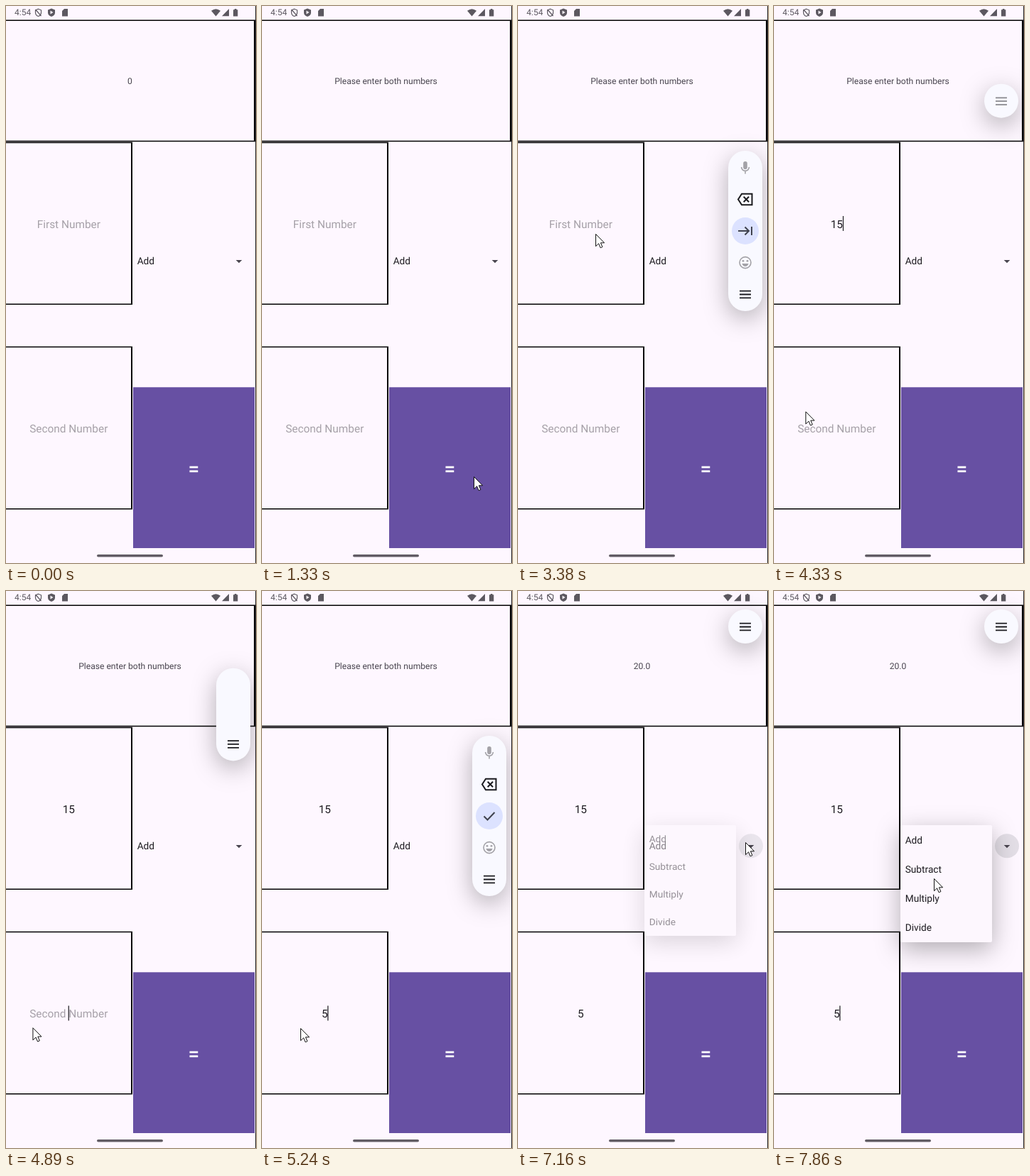
An HTML page for the animation above (8 s loop, 352x785 px).

```html
<!DOCTYPE html>
<html lang="en">
<head>
<meta charset="utf-8">
<title>Calculator demo</title>
<style>
  html, body { margin: 0; width: 100%; height: 100%; overflow: hidden; background: #fef7ff; }
  svg { display: block; width: 352px; height: 785px; font-family: Roboto, "Noto Sans", sans-serif; text-rendering: geometricPrecision; }
  .mid { text-anchor: middle; }
  .field { font-size: 15.4px; }
  .item { font-size: 13.7px; fill: #1d1b20; }
  .line { fill: none; stroke: currentColor; stroke-width: 2; }
  .thin { stroke-width: 1.6; }
  .float { filter: drop-shadow(0 10px 17px rgba(0, 0, 0, .3)); }
</style>
</head>
<body>
<svg viewBox="0 0 352 785">
  <rect width="352" height="785" fill="#fef7ff"/>

  <!-- status bar -->
  <g fill="#5c5860">
    <text x="12" y="13.4" font-size="12">4:54</text>
    <path d="M45.5 4.2l4 1.6v3.4q0 3.8-4 5.3q-4-1.500-4-5.3V5.8zM41.5 5l8 9" fill="none" stroke="#5c5860" stroke-width="1.2"/>
    <path d="M64 3.4l5 2v3.8q0 4.2-5 5.8q-5-1.6-5-5.8V5.4z"/>
    <path d="M62.5 6.4v5.2l4-2.6z" fill="#fef7ff"/>
    <path d="M82 4h5v10.5h-8V7z"/>
    <path d="M289 6.7q6.5-5 13 0L295.5 14.5z"/>
    <path d="M304 14.3L314 4v10.3z"/>
    <path d="M320 5.2h1.8V4h2.7v1.2h1.8v9.3H320z"/>
  </g>

  <!-- layout -->
  <path class="line" d="M350 20V191M177 192V421M177 480V709"/>
  <path class="line" style="stroke-width:1.5" d="M0 20.3H351M0 190.6H351M0 192.5H178M0 420.3H178M0 480.5H178M0 708.7H178"/>
  <rect x="351" width="1" height="785" fill="#2a282c"/>
  <rect x="179" y="537.3" width="171" height="226.7" fill="#6750a3"/>
  <text class="mid" x="264.3" y="662" font-size="28" font-weight="500" fill="#fff">=</text>
  <rect x="128" y="773" width="93" height="3.6" rx="1.8" fill="#625d65"/>

  <text id="result" class="mid" x="174.5" y="110.3" font-size="12.1" fill="#49454f"></text>
  <text id="first" class="mid field" x="88.3" y="312.5"></text>
  <text id="second" class="mid field" x="88.3" y="600.7"></text>
  <rect id="caret" width="1.3" height="21" fill="#2b292e"/>

  <circle id="ripple" cx="328" cy="359.3" r="17" fill="#e3dee6"/>
  <text class="item" x="184.7" y="364.3">Add</text>
  <path d="M323.7 357.9h8.6l-4.3 4.3z" fill="#49454f"/>

  <g id="popup">
    <rect class="float" x="178" y="330" width="129" height="165" rx="2" fill="#fdf7fe"/>
    <g id="items"></g>
  </g>

  <g id="bar">
    <rect id="pill" class="float" x="296" width="48" rx="24" fill="#f9f9ff"/>
    <g id="tools">
      <g transform="translate(320 -89)" color="#a3a2a7">
        <rect x="-2.8" y="-9" width="5.6" height="11" rx="2.8" fill="currentColor"/>
        <path class="line thin" d="M-5.4-1a5.4 5.4 0 0 0 10.8 0M0 4.5v4"/>
      </g>
      <path class="line" transform="translate(320 -44.5)" color="#1b1b1f" d="M-10 0l5-7.7H9.5V7.7H-5zM-2.3-3.7l7.4 7.4m0-7.4l-7.4 7.4"/>
      <circle cx="320" r="19" fill="#dce2ff"/>
      <path id="action" class="line" transform="translate(320 0)" color="#40434f"/>
      <g transform="translate(320 44.6)" color="#a3a2a7" fill="currentColor">
        <circle class="line thin" r="8"/>
        <circle cx="-3" cy="-2.3" r="1.4"/>
        <circle cx="3" cy="-2.3" r="1.4"/>
        <path d="M-4.6 1.5h9.2q-1.3 4-4.6 4t-4.6-4"/>
      </g>
    </g>
    <path id="menu" d="M-8-4.4H8M-8 .5H8M-8 5.4H8" stroke="#1b1b1f" stroke-width="1.8"/>
  </g>

  <path id="cursor" d="M.5.5v17.200l4.100-3.900 2.500 6 2.800-1.200-2.500-5.800h5.200z" fill="#fff" stroke="#111" stroke-linejoin="round"/>
</svg>
<script>
const LOOP = 8000;
const TYPE_1 = 3710, TYPE_15 = 3850, FOCUS_2 = 4590, TYPE_5 = 5170;
const FIRST_CLICK = 1190, FOCUS_1 = 2430, SECOND_CLICK = 6270, MENU = 7120, HOVER = 7500;
const BAR_IN = 2570, SHRINK_1 = 3930, GROW = 4700, SHRINK_2 = 5380;
const NEXT_ICON = "M-10 0H5M-.5-5.5L5 0l-5.5 5.5M9-6V6";
const DONE_ICON = "M-7.5 .5l5 5L7.5-5";

const $ = id => document.getElementById(id);
const mix = (a, b, p) => a + (b - a) * p;
const span = (t, start, length) => Math.min(1, Math.max(0, (t - start) / length));
const sine = p => (1 - Math.cos(Math.PI * p)) / 2;
const easeOut = p => 1 - (1 - p) ** 3;
const set = (id, attrs) => {
  for (const name in attrs) $(id).setAttribute(name, attrs[name]);
};

$("items").innerHTML = ["Add", "Subtract", "Multiply", "Divide"]
  .map((word, i) => `<text class="item" x="184.7" y="${355.8 + i * 41.1}">${word}</text>`).join("");

// pointer glides: start, end, and where each one stops
const glides = [
  [520, 860, 298, 663], [1330, 2060, 45, 335], [2060, 2430, 109, 321],
  [3710, 4540, 33, 615], [4800, 5100, 54, 616], [5380, 6000, 257, 642],
  [6330, 6980, 320, 354], [7250, 7830, 225, 405]
];

function pointerAt(t) {
  if (t >= 120 && t < 190) return [99, 735];
  if (t < glides[0][0]) return null;
  return glides.reduce(([x, y], [start, end, toX, toY]) => {
    const p = sine(span(t, start, end - start));
    return [mix(x, toX, p), mix(y, toY, p)];
  }, [85, 595]);
}

// the caret blinks once a second, restarting at each action
function caretAt(t) {
  const last = [FOCUS_1, TYPE_1, TYPE_15, FOCUS_2, TYPE_5, SECOND_CLICK, HOVER].findLast(a => a <= t);
  if (!last || (t - last) % 1000 >= 500) return null;
  const digits = t < FOCUS_2 ? (t >= TYPE_1) + (t >= TYPE_15) : +(t >= TYPE_5);
  return [87.6 + digits * 4.6, t < FOCUS_2 ? 296 : 584.5];
}

// floating toolbar: y centre, openness, scale, opacity, tool and menu visibility
function barAt(t) {
  const open = { y: 317, k: 1, scale: 1, alpha: 1, tools: 1, menu: 1 };
  const shrink = start => {
    const tools = 1 - span(t, start, 160);
    return {
      ...open, tools,
      y: mix(317, 50, sine(span(t, start, 645))),
      k: 1 - sine(span(t, start, 280)),
      menu: Math.max(tools, span(t, start + 250, 300))
    };
  };
  if (t < BAR_IN) return null;
  if (t < SHRINK_1) {
    const p = easeOut(span(t, BAR_IN, 380));
    const fade = mix(.62, 1, p);
    return { ...open, y: mix(356, 317, p), scale: mix(.877, 1, p), alpha: mix(.88, 1, p), tools: fade, menu: fade };
  }
  if (t < GROW) return shrink(SHRINK_1);
  if (t < SHRINK_2) {
    const p = sine(span(t, GROW, 400));
    return { ...open, y: mix(50, 317, p), k: p, tools: span(t, GROW + 250, 200) };
  }
  return shrink(SHRINK_2);
}

function fill(id, value, hint) {
  $(id).textContent = value || hint;
  set(id, { fill: value ? "#1d1b20" : "#a6a1a8" });
}

function place(id, point) {
  set(id, { visibility: point ? "visible" : "hidden" });
  if (point) set(id, { transform: `translate(${point})` });
}

function drawBar(bar, t) {
  set("bar", { visibility: bar ? "visible" : "hidden" });
  if (!bar) return;
  const h = 48 + 178 * bar.k;
  set("bar", {
    opacity: bar.alpha,
    transform: `translate(${344 * (1 - bar.scale)} ${bar.y}) scale(${bar.scale})`
  });
  set("pill", { y: -h / 2, height: h });
  set("tools", { opacity: bar.tools });
  set("menu", { opacity: bar.menu, transform: `translate(320 ${89 * bar.k})` });
  set("action", { d: t < FOCUS_2 ? NEXT_ICON : DONE_ICON });
}

function draw(t) {
  $("result").textContent = t < FIRST_CLICK ? "0" : t < SECOND_CLICK ? "Please enter both numbers" : "20.0";
  fill("first", t < TYPE_1 ? "" : t < TYPE_15 ? "1" : "15", "First Number");
  fill("second", t < TYPE_5 ? "" : "5", "Second Number");
  place("caret", caretAt(t));
  place("cursor", pointerAt(t));
  drawBar(barAt(t), t);

  set("ripple", { opacity: span(t, MENU - 60, 140) });
  const p = easeOut(span(t, MENU, 220));
  set("popup", {
    opacity: p,
    transform: `translate(0 ${33 * (1 - p)}) scale(1 ${mix(.9, 1, p)})`
  });
}

function tick() {
  draw(performance.now() % LOOP);
  requestAnimationFrame(tick);
}
tick();
</script>
</body>
</html>
```
